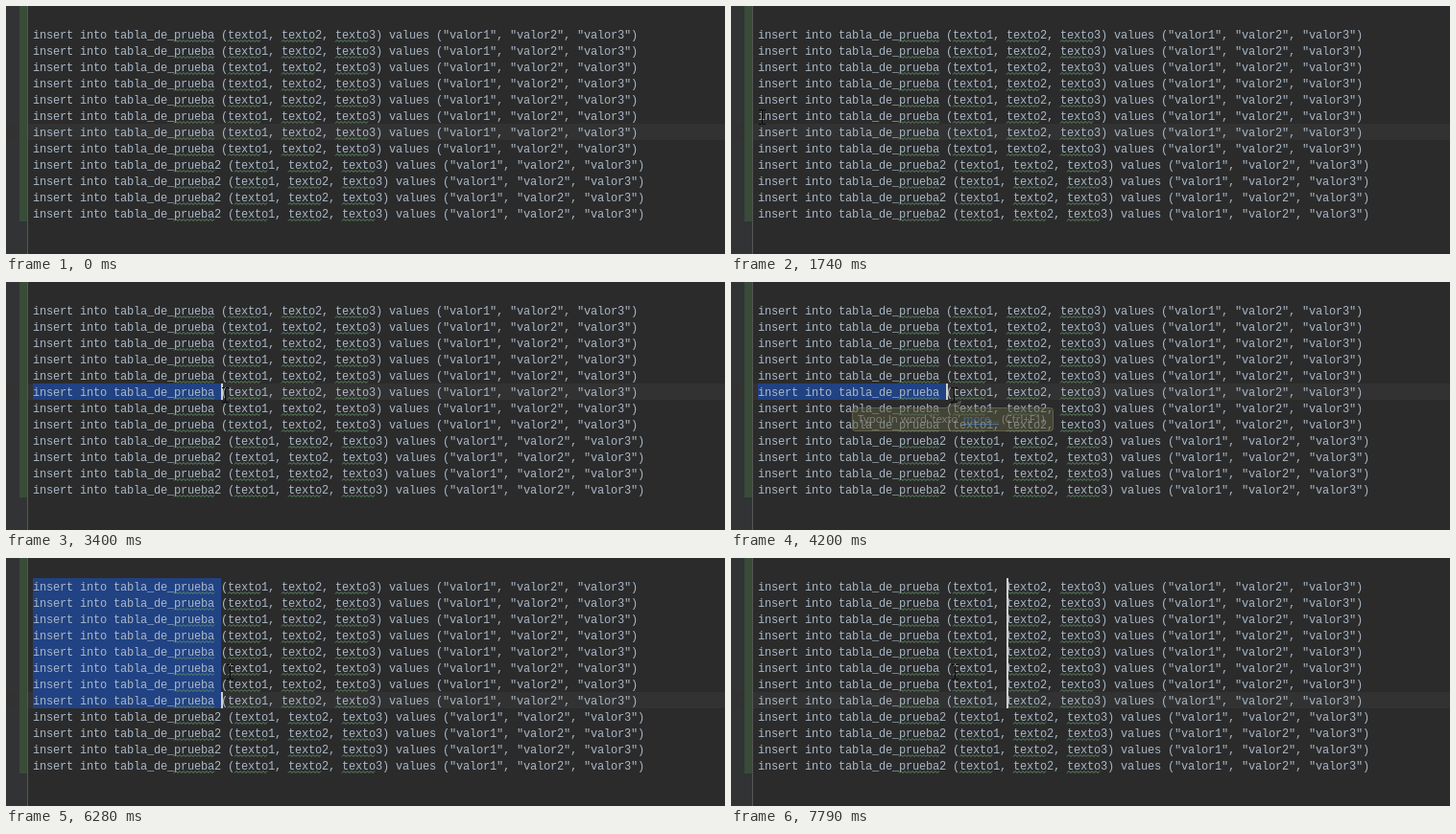
These frames come from a looping animation (749x259 px, 8000 ms). An HTML page with a canvas:

```html
<!DOCTYPE html>
<html lang="es">
<head>
<meta charset="utf-8">
<title>Column selection</title>
<style>
  html, body { margin: 0; height: 100%; overflow: hidden; background: #2b2b2b; }
  canvas { display: block; }
</style>
</head>
<body>
<canvas width="749" height="259"></canvas>
<script>
const ctx = document.querySelector('canvas').getContext('2d');
const LOOP = 8000, LEFT = 28, TOP = 21, CHAR = 7, ROW = 17;
const colX = col => LEFT + col * CHAR;
const rowY = row => TOP + row * ROW;

const lines = Array.from({ length: 12 }, (_, i) =>
  `insert into tabla_de_prueba${i < 8 ? '' : '2'} (texto1, texto2, texto3) values ("valor1", "valor2", "valor3")`);

// Mouse moves: start, end, number of jumps, final left and top.
const moves = [
  [230, 410, 4, 4, 119],
  [690, 720, 2, 13, 117],
  [870, 1010, 3, 26, 115],
  [1230, 1260, 2, 29, 115],
  [1710, 1740, 2, 29, 108],
  [2260, 2261, 1, 33, 108],
  [2400, 2520, 3, 99, 108],
  [2720, 3000, 6, 200, 108],
  [3200, 3400, 4, 225, 110],
  [3940, 4000, 2, 229, 110],
  [4420, 4421, 1, 230, 111]
];

function mouseAt(t) {
  let x = 278, y = 157;
  for (const [start, end, jumps, toX, toY] of moves) {
    if (t < start) break;
    const done = Math.min(jumps, Math.floor((t - start) / (end - start) * (jumps - 1) + 1e-6) + 1);
    x += Math.round((toX - x) * done / jumps);
    y += Math.round((toY - y) * done / jumps);
  }
  return { x, y };
}

// Current line, rows holding carets, selected columns and caret column.
function editorAt(t, mouse) {
  if (t < 2260) return { line: 6, first: 0, last: -1, sel: [0, 0], caret: 0 };
  if (t < 5300) {
    const caret = Math.min(28, Math.floor((mouse.x + 3.5 - 29) / CHAR));
    const hidden = (t >= 4280 && t < 4780) || t >= 5260;
    return { line: 5, first: 5, last: 5, sel: [0, caret], caret, hidden };
  }
  const all = { line: 7, first: 0, last: 7 };
  if (t < 6520) return { ...all, sel: [0, 28], caret: 28, onlyLast: t >= 6280 };
  if (t < 7410) return { ...all, sel: [28, 52], caret: 28, hidden: t >= 7270 };
  return { ...all, sel: [0, 0], caret: t < 7540 ? 29 : t < 7790 ? 35 : 37 };
}

function rect(color, x, y, w, h) {
  ctx.fillStyle = color;
  ctx.fillRect(x, y, w, h);
}

function squiggle(x, y, width) {
  ctx.beginPath();
  for (let i = 0; i <= width; i += 2) ctx.lineTo(x + i, y + (i % 4 ? 0 : 2));
  ctx.strokeStyle = '#5f8f64';
  ctx.lineWidth = 1;
  ctx.stroke();
}

function drawLine(text, row) {
  ctx.font = '12px "Liberation Mono", monospace';
  ctx.letterSpacing = '-0.2px';
  ctx.fillStyle = '#a9b7c6';
  ctx.fillText(text, LEFT, rowY(row) + 13);
  for (const word of text.matchAll(/prueba|texto/g))
    squiggle(colX(word.index), rowY(row) + 14.5, word[0].length * CHAR);
}

function drawTooltip(alpha) {
  ctx.globalAlpha = alpha;
  ctx.beginPath();
  ctx.moveTo(223.5, 131.5);
  ctx.lineTo(239.5, 124.5);
  ctx.lineTo(236.5, 131.5);
  ctx.arcTo(335.5, 131.5, 335.5, 155.5, 3);
  ctx.arcTo(335.5, 155.5, 126.5, 155.5, 3);
  ctx.arcTo(126.5, 155.5, 126.5, 131.5, 3);
  ctx.arcTo(126.5, 131.5, 223.5, 131.5, 3);
  ctx.closePath();
  ctx.fillStyle = '#5c5c42';
  ctx.fill();
  ctx.strokeStyle = '#8c8c6a';
  ctx.lineWidth = 1;
  ctx.stroke();

  ctx.font = '11.4px "Open Sans", sans-serif';
  ctx.letterSpacing = '0px';
  let x = 132;
  for (const [text, color] of [["Typo: In word 'texto' ", '#c4c4c4'], ['more...', '#589df6'], [' (Ctrl+F1)', '#c4c4c4']]) {
    const width = ctx.measureText(text).width;
    ctx.fillStyle = color;
    ctx.fillText(text, x, 147);
    if (text === 'more...') rect(color, x, 148, width, 1);
    x += width;
  }
  ctx.globalAlpha = 1;
}

function drawBeam({ x, y }) {
  rect('#0a0a0a', x + 3, y + 1, 1, 14);
  for (const end of [0, 15]) {
    rect('#0a0a0a', x, y + end, 3, 1);
    rect('#0a0a0a', x + 4, y + end, 3, 1);
  }
}

function drawArrow({ x, y }) {
  const shape = new Path2D('M.5 .5V16.5L4.3 12.9L6.8 18.5L9.2 17.5L6.8 12H11.5Z');
  ctx.save();
  ctx.translate(x, y);
  ctx.fillStyle = '#fff';
  ctx.fill(shape);
  ctx.strokeStyle = '#000';
  ctx.lineWidth = 1;
  ctx.stroke(shape);
  ctx.restore();
}

function draw(t) {
  const mouse = mouseAt(t);
  const { line, first, last, sel, caret, hidden, onlyLast } = editorAt(t, mouse);

  rect('#2b2b2b', 0, 0, 749, 259);
  rect('#313335', 0, 0, 22, 259);
  rect('#323232', 0, rowY(line), 749, ROW);
  rect('#384c38', 14, 0, 8, 225);
  rect('#555555', 22, 0, 1, 259);

  for (let row = first; row <= last; row++)
    rect('#214283', colX(sel[0]), rowY(row), (sel[1] - sel[0]) * CHAR, ROW);
  lines.forEach(drawLine);
  if (!hidden)
    for (let row = onlyLast ? last : first; row <= last; row++)
      rect('#d0d0d0', colX(caret), rowY(row), 2, ROW);

  if (t >= 4200 && t < 5300) drawTooltip(t < 4280 ? 0.5 : 1);
  if (t >= 410 && t < 1710) drawArrow(mouse);
  else if (t >= 70) drawBeam(mouse);
}

function tick() {
  draw(performance.now() % LOOP);
  requestAnimationFrame(tick);
}
tick();
</script>
</body>
</html>
```
